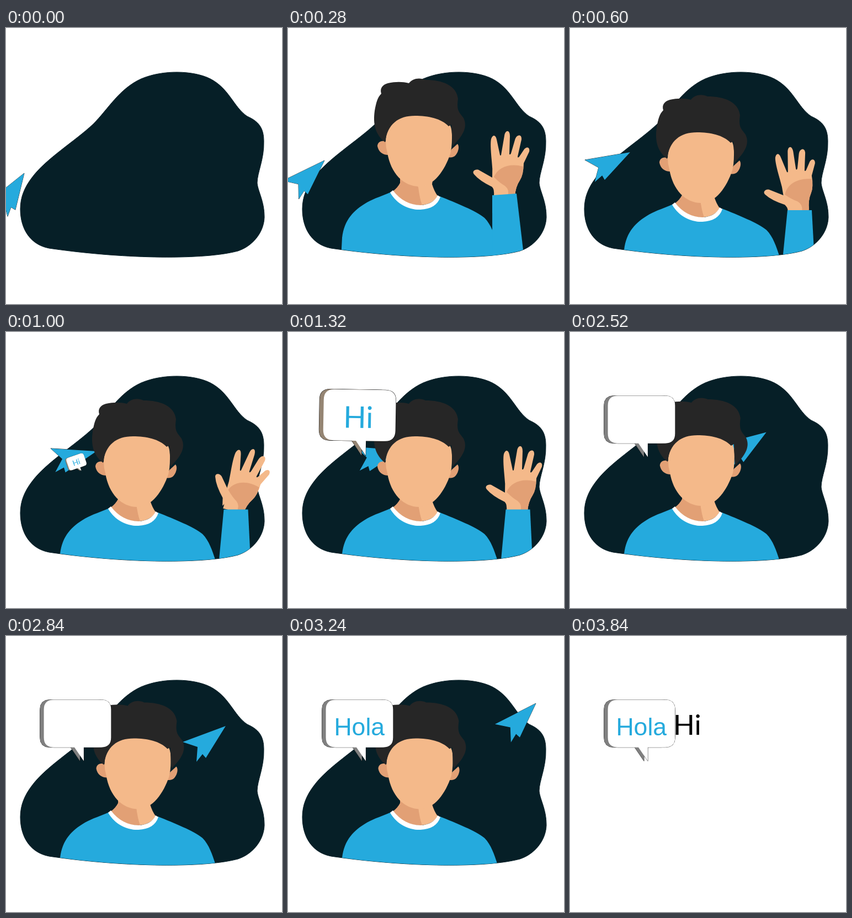
An HTML page with a canvas for the animation above (3880 ms loop, 500 by 500 pixels).

```html
<!DOCTYPE html>
<html lang="en">
<head>
<meta charset="utf-8">
<title>Hi, Hola</title>
<style>
html, body { margin: 0; width: 100%; height: 100%; overflow: hidden; background: #fff; }
canvas { display: block; width: 100vw; height: 100vh; }
</style>
</head>
<body>
<canvas id="stage" width="500" height="500"></canvas>
<script>
const ctx = document.getElementById('stage').getContext('2d');
const LOOP = 3880, STEP = 40;
const BLUE = '#25aadd', DARK = '#061f27', SKIN = '#f4b98a', SHADE = '#e2a075', HAIR = '#262626';

const BLOB = 'M26 328C26 306 34 288 47 271C72 237 125 205 158 174C185 147 205 110 245 92' +
  'C285 75 340 77 370 92C405 110 412 143 437 160C457 169 467 180 467 205' +
  'C468 238 455 262 455 281C457 298 468 313 468 343C467 372 445 396 420 404' +
  'C360 420 220 419 85 400C45 396 26 365 26 328Z';
const shape = d => new Path2D(d);
const blob = shape(BLOB);
const frontClip = shape('M0 0H500V300H0Z' + BLOB);

const torso = shape('M98 402C102 369 119 352 143 338C157 330 172 326 187 319C205 350 258 358 275 327' +
  'C305 339 340 353 356 366C368 378 374 397 379 412L390 460H95Z');
const collar = shape('M185 320C198 343 222 352 240 351C259 350 271 343 276 328L271 325' +
  'C266 336 256 342 240 343C222 343 203 334 190 316Z');
const neck = shape('M203 285V303Q199 311 190 318C203 336 222 343 240 343C256 342 267 335 271 326Q265 318 261 305L264 285Z');
const neckShade = shape('M203 285V303Q199 311 190 318C203 336 222 343 243 343Q238 329 236 310Z');

const ears = shape('M178 236C169 232 162 237 162 244C164 254 171 260 182 260Z' +
  'M296 250L307 240C311 244 309 254 304 260C300 265 294 265 290 264Z');
const face = shape('M177 235C178 208 195 180 235 180C270 180 300 190 297 230Q297 247 294 258' +
  'C284 288 264 317 238 317C209 317 186 293 180 256Q177 246 177 235Z');
const hair = shape('M176 237C157 222 154 203 157 180C160 164 162 156 169 149C166 139 171 133 181 130' +
  'C195 127 207 127 219 130C225 121 239 119 249 124C280 124 305 134 308 158' +
  'C305 180 310 182 318 193C326 210 317 225 298 244L296 205L291 208' +
  'C278 194 254 189 230 189C200 189 180 204 176 237Z');

// Hand and thumb, relative to the wrist
const hand = shape('M-19 5Q-18 -8 -22 -12L-22 -29Q-21 -45 -23 -60Q-26 -90 -24 -99C-21 -107 -16 -107 -14 -98' +
  'L-8 -70Q-7 -68 -6 -70L0 -105C2 -116 10 -116 10 -104L9 -72Q10 -69 12 -73L19 -97C22 -108 32 -108 31 -98' +
  'L24 -67Q24 -64 27 -67L35 -79C39 -86 47 -85 45 -76L35 -55Q35 -35 28 -24Q20 -12 19 5Z');
const thumb = shape('M-14 0L-22 -12Q-45 -23 -55 -35C-60 -41 -51 -46 -45 -42L-22 -29L-8 -30Z');
const palm = shape('M-19 -30C-12 -48 10 -56 34 -49Q34 -33 28 -24Q20 -12 19 5H6Q10 -7 1 -14Q-8 -19 -19 -30Z');

const plane = shape('M0 0L-78 29L-51 38L-53 65L-42 51L-36 58Z');
const bubble = shape('M-41 -44H46Q64 -44 64 -26V25Q64 43 46 43H14V68L-3 43H-41Q-59 43 -59 25V-26Q-59 -44 -41 -44Z');

// Rows are [time, ...values]
const planeKeys = [[0, 33, 263, -38.6], [280, 66, 240, -26], [600, 109, 225, -9.7], [1000, 164, 216, 3.5],
  [1600, 240, 212, 2], [2200, 314, 195, -9], [2840, 398, 163, -20.4], [3240, 449, 122, -27]];
const riseKeys = [[0, 360], [280, -22], [560, 0]];
const sleeveKeys = [[0, 380, 660], [280, 392, 301.5], [600, 416, 330], [1000, 416.5, 321.5]];
// x, y, turn of the hand, bend of the thumb
const handKeys = [[0, 380, 659, 0, 0], [280, 392, 300, 0, 0], [400, 408, 308, 8, 0], [600, 413.5, 328, -10.5, 3],
  [820, 417, 324, 38, 20], [1000, 412.8, 319.7, 15.5, 20], [1200, 413, 321, -8, 0], [1440, 417, 319, 8, 0],
  [1680, 417, 319, 4.5, 0]];
const bubbleKeys = [[900, 0, -22], [1000, .27, -19], [1220, 1.25, 8], [1400, .93, -4], [1560, 1.03, 1], [1680, .99, 0]];
const nodKeys = [[2160, 0], [2840, 1]];

function segment(rows, t) {
  let i = 0;
  while (i < rows.length - 2 && t >= rows[i + 1][0]) i++;
  const a = rows[i], b = rows[i + 1];
  return [i, Math.min(1, Math.max(0, (t - a[0]) / (b[0] - a[0])))];
}

function ease(rows, t) {
  const [i, u] = segment(rows, t), k = u * u * (3 - 2 * u);
  return rows[i].slice(1).map((v, n) => v + (rows[i + 1][n + 1] - v) * k);
}

// Smooth curve through all keys with time-aware tangents
function spline(rows, t) {
  const [i, u] = segment(rows, t), a = rows[i], b = rows[i + 1], span = b[0] - a[0];
  const slope = (j, n) => {
    const p = rows[Math.max(0, j - 1)], q = rows[Math.min(rows.length - 1, j + 1)];
    return (q[n] - p[n]) / (q[0] - p[0]) * span;
  };
  return [1, 2, 3].map(n => {
    const d = b[n] - a[n], m = slope(i, n), w = slope(i + 1, n);
    return a[n] + u * (m + u * (3 * d - 2 * m - w + u * (m + w - 2 * d)));
  });
}

function fill(path, color) {
  ctx.fillStyle = color;
  ctx.fill(path);
}

function outline(path, width, color = '#111') {
  ctx.strokeStyle = color;
  ctx.lineWidth = width;
  ctx.stroke(path);
}

function place(x, y, deg, scale, draw) {
  ctx.save();
  ctx.translate(x, y);
  ctx.rotate(deg * Math.PI / 180);
  ctx.scale(scale, scale);
  draw();
  ctx.restore();
}

function label(text, font, x, y, color, alpha = 1) {
  ctx.globalAlpha = alpha;
  ctx.font = font;
  ctx.fillStyle = color;
  ctx.fillText(text, x, y);
  ctx.globalAlpha = 1;
}
const HI = '51px Lato, sans-serif', HOLA = '45px "Liberation Sans", Arial, sans-serif';

function drawPlane(t) {
  const [x, y, deg] = spline(planeKeys, t);
  place(x, y, deg + 20.4, 1, () => {
    outline(plane, .8);
    fill(plane, BLUE);
  });
}

function drawArm(t) {
  const [sx, sy] = ease(sleeveKeys, t), [hx, hy, deg, bend] = ease(handKeys, t);
  place(hx, hy, deg, 1, () => {
    place(-20, -20, bend, 1, () => {
      ctx.translate(20, 20);
      fill(thumb, SKIN);
    });
    fill(hand, SKIN);
    fill(palm, SHADE);
  });
  const shift = (sx - 416) * .62, tilt = (416 - sx) * .06;
  ctx.fillStyle = BLUE;
  ctx.beginPath();
  ctx.moveTo(sx - 22, sy + tilt);
  ctx.lineTo(sx + 22, sy - tilt);
  ctx.lineTo(443 + shift, Math.max(420, sy + 90));
  ctx.lineTo(385 + shift, Math.max(420, sy + 90));
  ctx.fill();
}

function drawPerson(t) {
  const [rise] = ease(riseKeys, t), [nod] = ease(nodKeys, t);
  ctx.save();
  ctx.clip(frontClip);
  place(0, rise, 0, 1, () => {
    fill(torso, BLUE);
    fill(neck, SKIN);
    fill(neckShade, SHADE);
    fill(collar, '#fff');
  });
  if (t < 2000) drawArm(t);
  place(nod * 1.5, rise * 1.36 - nod * 3.5, 0, 1, () => {
    fill(ears, SHADE);
    fill(face, SKIN);
    fill(hair, HAIR);
  });
  ctx.restore();
}

function drawBubble(t) {
  const [size, deg] = ease(bubbleKeys, t);
  if (size <= 0) return;
  place(127, 264 - 106 * size, deg, size, () => {
    const back = draw => place(-7, 0, 0, 1, draw);
    back(() => outline(bubble, 1));
    outline(bubble, 1);
    back(() => fill(bubble, t < 2000 ? '#958573' : '#808080'));
    fill(bubble, '#fff');
    ctx.save();
    ctx.clip(bubble);
    if (t < 2000) {
      const out = Math.max(0, (t - 1920) / 80);
      label('Hi', HI, -25 + 85 * out, 21, BLUE, 1 - out);
    }
    if (t > 2960) {
      const k = Math.min(1, (t - 2960) / 80);
      label('Hola', HOLA, -44 - 85 * (1 - k), 21.5, BLUE, k);
    }
    ctx.restore();
  });
}

function frame(now) {
  const t = Math.floor(now % LOOP / STEP) * STEP;
  ctx.fillStyle = '#fff';
  ctx.fillRect(0, 0, 500, 500);
  if (t < 3840) {
    fill(blob, DARK);
    outline(blob, 1, DARK);
    drawPlane(t);
    if (t > 0) drawPerson(t);
  }
  drawBubble(t);
  if (t >= 3840) label('Hi', HI, 187, 179, '#000');
}

const start = performance.now();
function tick() {
  frame(performance.now() - start);
  requestAnimationFrame(tick);
}
tick();
</script>
</body>
</html>
```
